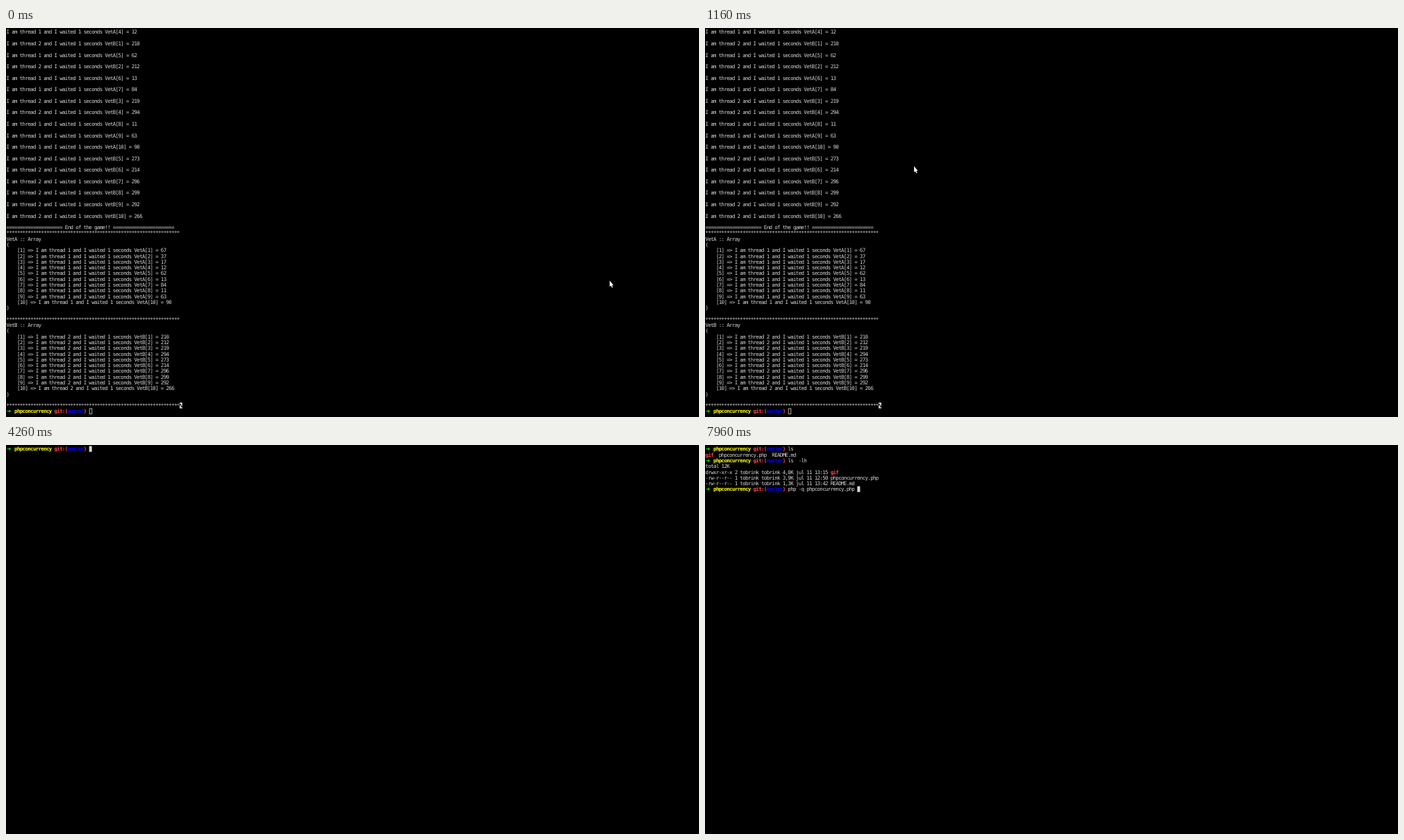
These frames come from a looping animation (998x561 px, 8 s). An HTML page with a canvas:

```html
<!DOCTYPE html>
<html lang="en">
<head>
<meta charset="utf-8">
<title>Terminal session</title>
<style>
  html, body { margin: 0; width: 100%; height: 100%; overflow: hidden; background: #000; }
  canvas { display: block; }
</style>
</head>
<body>
<canvas id="stage" width="998" height="561"></canvas>
<script>
const ctx = document.getElementById('stage').getContext('2d');
const LOOP = 8000;
const CELL_W = 3.832, CELL_H = 8.288, LEFT = 0.9, TOP = 1.5, BASE = 6.9;
const FONT = '7.5px "DejaVu Sans Mono", monospace';
const ARROW_FONT = 'bold 7.6px "DejaVu Sans", sans-serif';
const INK = '#d6d6d6', RED = '#ff4848', GREEN = '#00ff00', YELLOW = '#ffff00', BLUE = '#0000ff';

const FOCUS_AT = 2400, CLEAR_AT = 4000;
const LS_DONE = 4600, LIST_DONE = 5560;
const LS_KEYS = typing('ls', [4300, 4420]);
const LIST_KEYS = typing('ls  -lh', [4760, 4860, 4980, 5060, 5150, 5270, 5370]);
const RUN_KEYS = [
  ...typing('php -q php', [6060, 6160, 6260, 6400, 6560, 6700, 6840, 6980, 7100, 7200]),
  [7400, 'concurrency.php ']
];

const VALUES = {
  A: [67, 37, 17, 12, 62, 13, 84, 11, 63, 90],
  B: [210, 212, 219, 294, 273, 214, 296, 299, 292, 266]
};
const ORDER = 'A4 B1 A5 B2 A6 A7 B3 B4 A8 A9 A10 B5 B6 B7 B8 B9 B10'.split(' ');
const LOG = buildLog();

// Pointer path: time, x, y of the tip
const PATH = [
  [60, 869, 364], [560, 683, 217], [845, 416, 196], [1160, 301, 199], [1480, 218, 181]
];
const BEAM_AT = 1420;

function typing(text, times) {
  return times.map((time, i) => [time, text[i]]);
}

function typed(keys, t) {
  return keys.filter(k => k[0] <= t).map(k => k[1]).join('');
}

function message(set, n) {
  const thread = set === 'A' ? 1 : 2;
  return `I am thread ${thread} and I waited 1 seconds Vet${set}[${n}] = ${VALUES[set][n - 1]}`;
}

function buildLog() {
  const lines = ORDER.flatMap(id => [message(id[0], +id.slice(1)), '']);
  const stars = '*'.repeat(65);
  lines.push('='.repeat(21) + ' End of the game!! ' + '='.repeat(23), stars);
  for (const set of 'AB') {
    lines.push(`Vet${set} :: Array`, '(');
    for (let n = 1; n <= 10; n++) lines.push(`    [${n}] => ${message(set, n)}`);
    lines.push(')', '', stars);
  }
  return lines;
}

const colX = col => LEFT + col * CELL_W;
const rowY = row => TOP + row * CELL_H;

// Sets the text on the cell grid, each glyph centred in its cell
function write(col, row, text, color = INK, bold = false) {
  ctx.font = (bold ? 'bold ' : '') + FONT;
  ctx.letterSpacing = '0px';
  const spacing = CELL_W - ctx.measureText('0'.repeat(50)).width / 50;
  ctx.letterSpacing = spacing + 'px';
  ctx.fillStyle = color;
  ctx.fillText(text, colX(col) + spacing / 2, rowY(row) + BASE);
}

function arrow(row) {
  ctx.font = ARROW_FONT;
  ctx.letterSpacing = '0px';
  ctx.fillStyle = GREEN;
  ctx.fillText('➜', colX(0), rowY(row) + BASE - 0.4);
}

function prompt(row, command = '') {
  arrow(row);
  write(3, row, 'phpconcurrency', YELLOW, true);
  write(18, row, 'git:(', RED, true);
  write(23, row, 'master', BLUE, true);
  write(29, row, ')', RED, true);
  write(31, row, command);
}

function block(col, row) {
  ctx.fillStyle = INK;
  ctx.fillRect(colX(col), rowY(row), CELL_W + 0.2, CELL_H);
}

function hollow(col, row) {
  ctx.strokeStyle = INK;
  ctx.lineWidth = 0.8;
  ctx.strokeRect(colX(col) + 0.5, rowY(row) + 0.4, CELL_W - 0.2, CELL_H - 0.7);
}

function drawLog(t) {
  LOG.forEach((line, row) => line && write(0, row, line));
  block(65, 65);
  write(65, 65, '%', '#000', true);
  prompt(66);
  (t < FOCUS_AT ? hollow : block)(31, 66);
}

function drawShell(t) {
  const first = typed(LS_KEYS, t);
  prompt(0, first);
  if (t < LS_DONE) return block(31 + first.length, 0);

  write(0, 1, 'gif', RED, true);
  write(5, 1, 'phpconcurrency.php  README.md');
  const second = typed(LIST_KEYS, t);
  prompt(2, second);
  if (t < LIST_DONE) return block(31 + second.length, 2);

  const owner = 'tobrink tobrink';
  write(0, 3, 'total 12K');
  write(0, 4, `drwxr-xr-x 2 ${owner} 4,0K jul 11 13:15`);
  write(47, 4, 'gif', RED, true);
  write(0, 5, `-rw-r--r-- 1 ${owner} 3,9K jul 11 12:50 phpconcurrency.php`);
  write(0, 6, `-rw-r--r-- 1 ${owner} 1,3K jul 11 13:42 README.md`);
  const third = typed(RUN_KEYS, t);
  prompt(7, third);
  block(31 + third.length, 7);
}

// Smooth curve through PATH, at rest at both ends
function pointerAt(t) {
  const last = PATH.length - 1;
  if (t <= PATH[0][0]) return PATH[0].slice(1);
  if (t >= PATH[last][0]) return PATH[last].slice(1);
  const i = PATH.findIndex(p => p[0] > t) - 1;
  const a = PATH[i], b = PATH[i + 1], span = b[0] - a[0], u = (t - a[0]) / span;
  const slope = (k, axis) => k === 0 || k === last ? 0 :
    (PATH[k + 1][axis] - PATH[k - 1][axis]) / (PATH[k + 1][0] - PATH[k - 1][0]);
  return [1, 2].map(axis => {
    const ease = u * u * (3 - 2 * u);
    return a[axis] + (b[axis] - a[axis]) * ease
      + span * u * (1 - u) * ((1 - u) * slope(i, axis) - u * slope(i + 1, axis));
  });
}

function drawPointer(t) {
  const [x, y] = pointerAt(t);
  ctx.save();
  ctx.translate(x, y);
  if (t < BEAM_AT) {
    const shape = new Path2D('M0.4 0.3 V9 L2.3 7.5 L3.6 10.6 L4.9 10 L3.7 7 H5.8 Z');
    ctx.lineWidth = 0.8;
    ctx.strokeStyle = '#000';
    ctx.fillStyle = '#fff';
    ctx.stroke(shape);
    ctx.fill(shape);
  } else {
    ctx.lineWidth = 1;
    ctx.strokeStyle = '#d0d0d0';
    ctx.stroke(new Path2D('M-1.7 -4 H2.3 M0.3 -4 V4 M-1.7 4 H2.3'));
  }
  ctx.restore();
}

function draw(t) {
  ctx.fillStyle = '#000';
  ctx.fillRect(0, 0, 998, 561);
  if (t < CLEAR_AT) {
    drawLog(t);
    drawPointer(t);
  } else {
    drawShell(t);
  }
}

ctx.textBaseline = 'alphabetic';
ctx.textRendering = 'geometricPrecision';
const start = performance.now();
function tick() {
  draw((performance.now() - start) % LOOP);
  requestAnimationFrame(tick);
}
tick();
</script>
</body>
</html>
```
